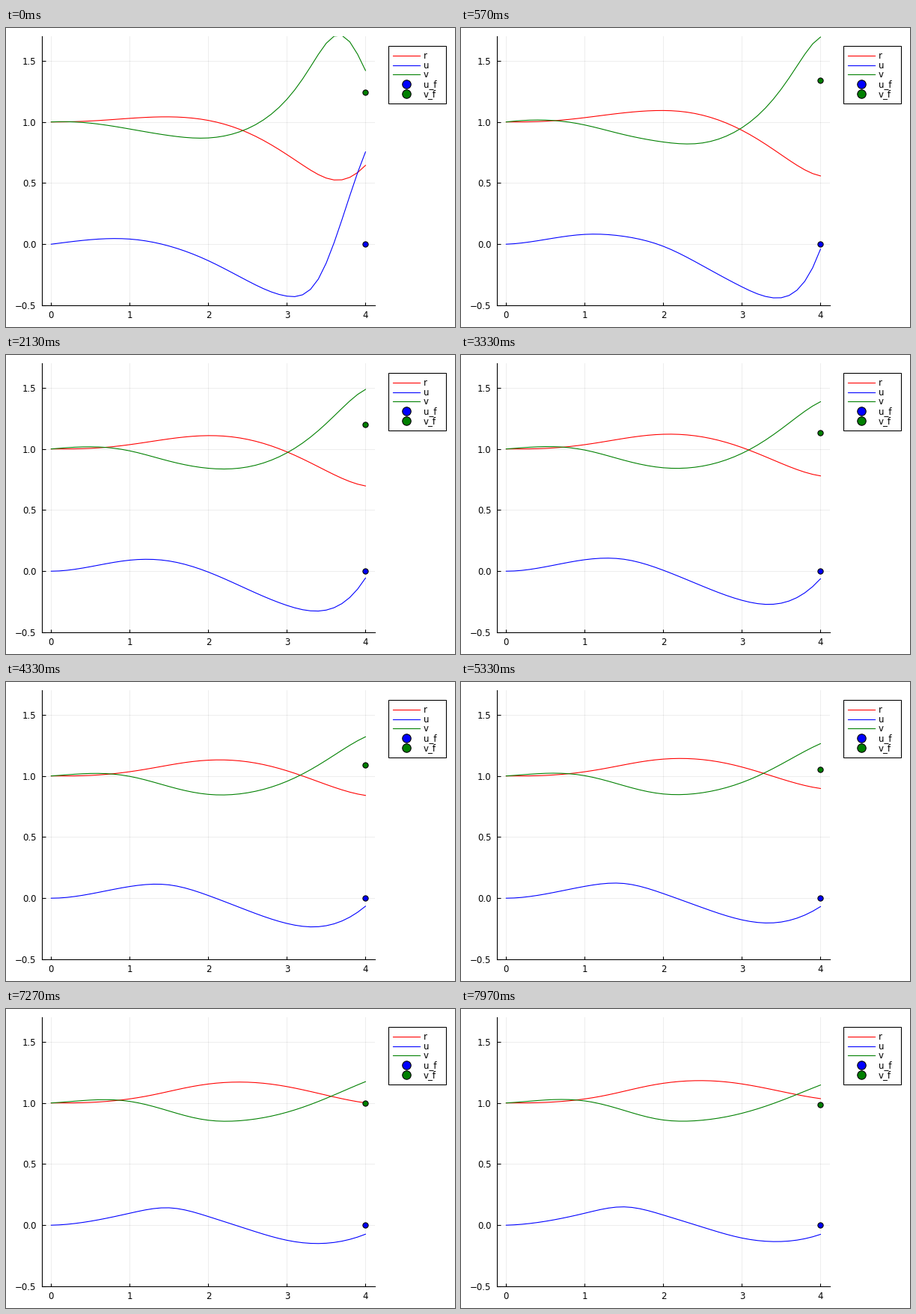
A matplotlib script for the animation above (8 s loop, 600 by 400 pixels).

```python
import numpy as np
import matplotlib.pyplot as plt
from matplotlib.animation import FuncAnimation
from matplotlib.patches import Rectangle

W, H, DPI = 600, 400, 100
FRAMES, LOOP = 240, 8000
PX = 72 / DPI  # one pixel in points
COLORS = ["red", "blue", "green"]
plt.rcParams.update({"font.family": "DejaVu Sans", "font.size": 8.5})

DT = 0.1
t = np.arange(41) * DT


class Profile:
    """Spline over time whose key values drift with the iteration.

    The first row is the initial guess, which fades quickly; the others are
    reached at STEPS and joined by a parabola in sqrt(iteration).
    """
    STEPS = np.sqrt([37, 100, 239])
    FADE = 3

    def __init__(self, knots, start, rows):
        knots = np.array(knots)
        self.spline = self.basis(t, knots) @ np.linalg.inv(self.basis(knots, knots))
        first, *later = [np.append(start, row) for row in rows]
        self.coef = np.polyfit(self.STEPS, later, 2)
        self.extra = first - self.coef[-1]

    @staticmethod
    def basis(x, knots):
        cols = [x ** p for p in range(4)]
        cols += [np.clip(x - k, 0, None) ** 3 for k in knots[2:-2]]
        return np.stack(cols, axis=1)

    def at(self, i):
        trend = np.array([i, i ** 0.5, 1]) @ self.coef
        return self.spline @ (trend + self.extra * np.exp(-i / self.FADE))


radial_speed = Profile([0, 0.5, 1, 1.5, 2, 2.5, 3, 3.4, 3.7, 4], 0, [
    [.037, .042, -.015, -.135, -.300, -.425, -.285, .200, .755],
    [.038, .086, .073, -.015, -.165, -.315, -.380, -.317, -.050],
    [.036, .094, .098, .008, -.122, -.237, -.269, -.215, -.062],
    [.032, .098, .150, .083, -.016, -.105, -.134, -.122, -.075],
])
momentum = Profile([0, 0.5, 1, 1.5, 2, 2.5, 3, 4], 1, [
    [.998, .970, .926, .880, .863, .869, .916],
    [1.022, 1.014, .968, .923, .897, .917, .994],
    [1.024, 1.026, .986, .948, .945, .976, 1.082],
    [1.029, 1.050, 1.029, .999, 1.016, 1.058, 1.187],
])


def trajectory(i):
    u = radial_speed.at(i)
    r = 1 + DT * np.append(0, np.cumsum(u[:-1]))  # Euler steps of r' = u
    return r, u, momentum.at(i) / r


fig = plt.figure(figsize=(W / DPI, H / DPI), dpi=DPI, facecolor="white")

ax = fig.add_axes([47.8 / W, 1 - 371 / H, 445.2 / W, 359.8 / H])
ax.set(xlim=(-0.12, 4.12), ylim=(-0.5, 1.7),
       xticks=range(5), yticks=np.arange(-0.5, 1.6, 0.5))
ax.set_axisbelow(True)
ax.grid(color="black", alpha=0.1, lw=0.7 * PX)
ax.spines[["top", "right"]].set_visible(False)
ax.spines[["left", "bottom"]].set_linewidth(1.1 * PX)
ax.tick_params(direction="in", length=4.5 * PX, width=1.1 * PX)
ax.tick_params(axis="x", pad=7 * PX)
ax.tick_params(axis="y", pad=7.5 * PX)


def dot(axes, x, y, color, size):
    return axes.plot([x], [y], "o", color=color, ms=size * PX, mec="black",
                     mew=1.1 * PX, zorder=5, clip_on=False, snap=False)[0]


lines = [ax.plot([], [], color=c, lw=1.1 * PX)[0] for c in COLORS]
dot(ax, 4, 0, "blue", 7.2)
v_dot = dot(ax, 4, 1, "green", 7.2)

# Legend, laid out in pixels
key = fig.add_axes([0, 0, 1, 1])
key.set(xlim=(0, W), ylim=(H, 0))
key.axis("off")
key.add_patch(Rectangle((510.5, 23.5), 77, 77, fc="white", ec="black", lw=1.1 * PX))
for n, (name, color) in enumerate(zip(["r", "u", "v", "u_f", "v_f"],
                                      COLORS + COLORS[1:])):
    y = 36.6 + 12.9 * n
    if n < 3:
        key.plot([516.5, 552.5], [y, y], color=color, lw=1.1 * PX)
    else:
        dot(key, 534.8, y, color, 11.4)
    key.text(557.8, y + 4, name, va="baseline")


def draw(i):
    curves = trajectory(i)
    for line, y in zip(lines, curves):
        line.set_data(t, y)
    # circular-orbit speed at the final radius
    v_dot.set_data([4], [curves[0][-1] ** -0.5])
    return lines + [v_dot]


anim = FuncAnimation(fig, draw, frames=FRAMES, interval=LOOP / FRAMES,
                     init_func=lambda: draw(0), repeat=True, repeat_delay=0)
plt.show()
```
